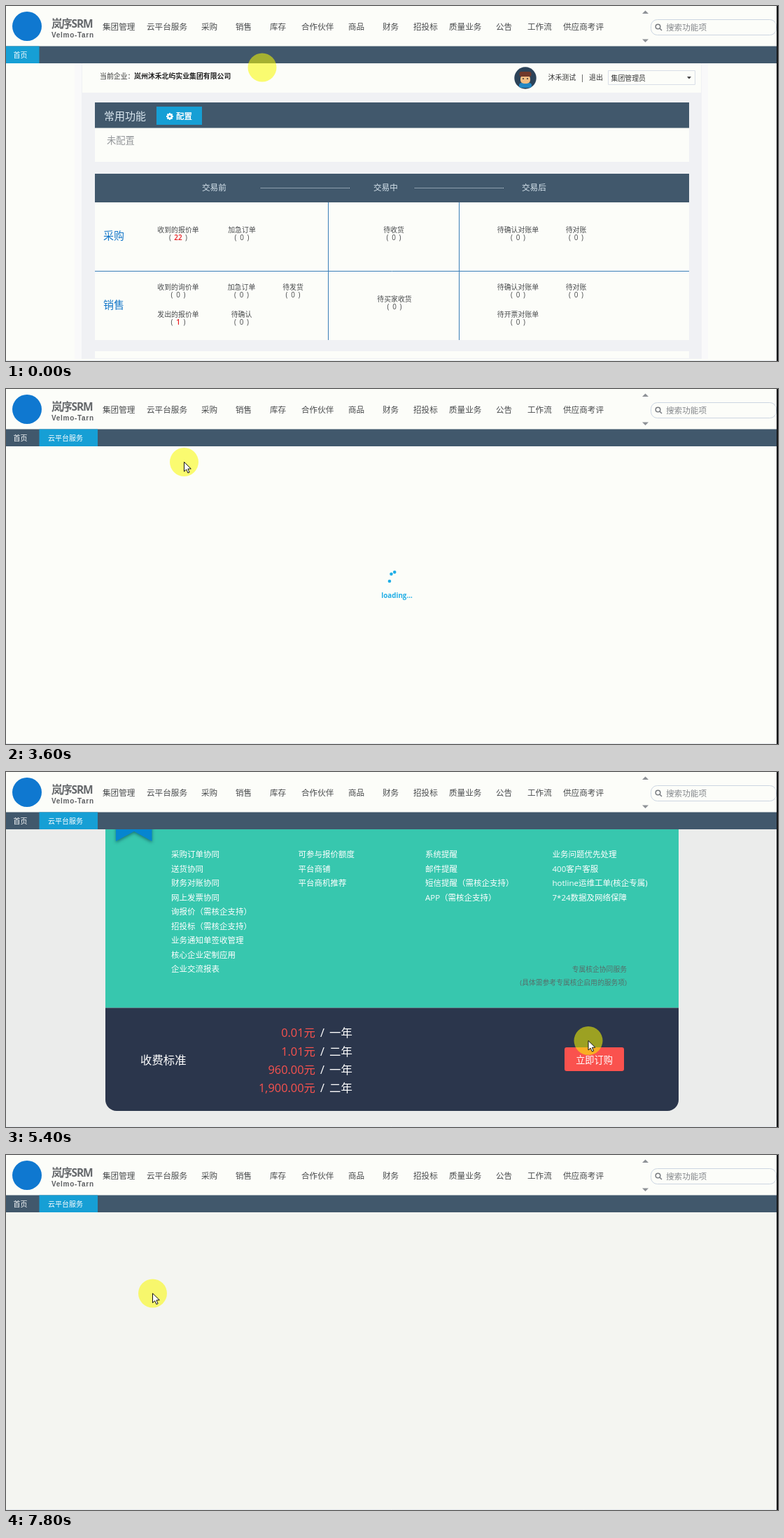
Recreate the animation shown at these times as an HTML page with a canvas. Size 1103 px wide and 508 px high, loop 8000 ms.

```html
<!DOCTYPE html>
<html lang="zh-CN">
<head>
<meta charset="utf-8">
<style>
html, body { margin: 0; width: 100%; height: 100%; overflow: hidden; background: #fcfdf9; }
canvas { display: block; }
</style>
</head>
<body>
<canvas id="stage" width="1103" height="508"></canvas>
<script>
const ctx = document.getElementById('stage').getContext('2d');
const LOOP = 8000, STEP = 200;
const FONT = '"Open Sans", "Noto Sans CJK SC", "Noto Sans CJK", sans-serif';
const PAPER = '#fcfdf9', SLATE = '#41586c', SKY = '#169fd5', NAVY = '#2b364c',
      TEAL = '#37c7ae', RED = '#fa524e', BLUE = '#1477c9', INK = '#484a4c';

function rect(x, y, w, h, fill, radius = 0, stroke) {
  ctx.beginPath();
  ctx.roundRect(x, y, w, h, radius);
  if (fill) { ctx.fillStyle = fill; ctx.fill(); }
  if (stroke) { ctx.strokeStyle = stroke; ctx.lineWidth = 1; ctx.stroke(); }
}

function circle(x, y, r, fill) {
  ctx.beginPath();
  ctx.arc(x, y, r, 0, Math.PI * 2);
  ctx.fillStyle = fill;
  ctx.fill();
}

function polygon(points, fill, stroke) {
  ctx.beginPath();
  points.forEach(([x, y]) => ctx.lineTo(x, y));
  ctx.closePath();
  ctx.fillStyle = fill;
  ctx.fill();
  if (stroke) { ctx.strokeStyle = stroke; ctx.lineWidth = 1; ctx.stroke(); }
}

function line(x1, y1, x2, y2, color, dash = []) {
  ctx.beginPath();
  ctx.setLineDash(dash);
  ctx.moveTo(x1, y1);
  ctx.lineTo(x2, y2);
  ctx.strokeStyle = color;
  ctx.lineWidth = 1;
  ctx.stroke();
  ctx.setLineDash([]);
}

// y is the vertical middle of the glyphs
function text(str, x, y, size, color, align = 'left', weight = 400) {
  ctx.font = `${weight} ${size}px ${FONT}`;
  ctx.textAlign = align;
  ctx.fillStyle = color;
  ctx.fillText(str, x, y + size * 0.38);
}

// Interpolates rows of [time, ...values]
function track(keys, t, ease = u => u) {
  const i = keys.findLastIndex(k => k[0] <= t);
  const a = keys[i], b = keys[i + 1] || a;
  const u = b === a ? 0 : ease((t - a[0]) / (b[0] - a[0]));
  return a.slice(1).map((v, n) => v + (b[n + 1] - v) * u);
}

const smooth = u => u * u * (3 - 2 * u);

const MENU = [['集团管理', 138], ['云平台服务', 201], ['采购', 279], ['销售', 328], ['库存', 377],
  ['合作伙伴', 422], ['商品', 489], ['财务', 538], ['招投标', 582], ['质量业务', 633],
  ['公告', 700], ['工作流', 745], ['供应商考评', 796]];

function drawHeader(serviceOpen) {
  rect(0, 0, 1103, 58, PAPER);
  circle(30, 29, 21, '#0f78d0');
  ctx.letterSpacing = '-1.2px';
  text('岚序SRM', 65, 25, 15.5, '#66696c', 'left', 700);
  ctx.letterSpacing = '0.7px';
  ctx.font = 'bold 10px "Liberation Sans", sans-serif';
  ctx.fillStyle = '#5d5f62';
  ctx.fillText('Velmo-Tarn', 65, 45);
  ctx.letterSpacing = '0px';
  MENU.forEach(([label, x]) => text(label, x, 29.5, 11.6, INK));

  polygon([[909, 11], [913.5, 6.5], [918, 11]], '#8d9196');
  polygon([[909, 47.5], [913.5, 52], [918, 47.5]], '#8d9196');
  rect(921.5, 19.5, 179, 22, PAPER, 9, '#ccd6e2');
  ctx.beginPath();
  ctx.arc(931.5, 29.5, 3.3, 0, 7);
  ctx.moveTo(934, 32);
  ctx.lineTo(937, 35);
  ctx.strokeStyle = '#777b80';
  ctx.lineWidth = 1.5;
  ctx.stroke();
  text('搜索功能项', 943, 30.5, 11.6, '#85888c');

  rect(0, 57.5, 1101, 24.5, SLATE);
  if (serviceOpen) {
    rect(47.5, 57.5, 83.5, 24.5, SKY);
    text('云平台服务', 60, 70, 10, '#fff');
  } else {
    rect(0, 57.5, 47.5, 24.5, SKY);
  }
  text('首页', 10.5, 70, 10, '#fff');
}

const TASKS = [['收到的报价单', 246, 320, 22], ['加急订单', 337, 320, 0], ['待收货', 554, 320, 0],
  ['待确认对账单', 731.5, 320, 0], ['待对账', 814.5, 320, 0],
  ['收到的询价单', 246, 402.5, 0], ['加急订单', 336.5, 402.5, 0], ['待发货', 410, 402.5, 0],
  ['待买家收货', 555, 419, 0], ['待确认对账单', 731.5, 402.5, 0], ['待对账', 814.5, 402.5, 0],
  ['发出的报价单', 246, 441.5, 1], ['待确认', 336.5, 441.5, 0], ['待开票对账单', 731.5, 441.5, 0]];

function drawAvatar() {
  circle(742, 103, 15.7, '#2c4359');
  rect(733, 110, 18, 7, '#2387c4', 5);
  rect(735, 99, 14, 12, '#f2bd83', 5);
  rect(733.5, 94, 17, 7, '#70382a', 3);
  circle(739, 104, 1, '#333');
  circle(745, 104, 1, '#333');
}

function drawGear(x, y) {
  ctx.beginPath();
  for (let i = 0; i < 8; i++) {
    const a = i * Math.PI / 4;
    ctx.moveTo(x, y);
    ctx.lineTo(x + 5 * Math.cos(a), y + 5 * Math.sin(a));
  }
  ctx.strokeStyle = '#fff';
  ctx.lineWidth = 2;
  ctx.stroke();
  circle(x, y, 3.9, '#fff');
  circle(x, y, 1.6, SKY);
}

function drawHome() {
  rect(98, 82, 905, 423, '#f9f9fa');
  rect(108, 82, 886, 423, '#f0f1f4');
  rect(109, 82, 884, 42, PAPER);
  text('当前企业：', 134, 100.5, 9.9, '#333');
  text('岚州沐禾北屿实业集团有限公司', 183, 100.5, 9.9, '#222', 'left', 700);
  drawAvatar();
  text('沐禾测试', 774.5, 102.5, 9.9, '#333');
  text('|', 823.5, 102.5, 9.9, '#333', 'center');
  text('退出', 833, 102.5, 9.9, '#333');
  rect(860.5, 92.5, 124, 20, PAPER, 0, '#d9dee7');
  text('集团管理员', 864.5, 103, 9.9, '#333');
  polygon([[973, 101], [979, 101], [976, 104.5]], '#444');

  rect(127, 174, 849, 49, PAPER);
  rect(127, 138, 849, 36.5, SLATE);
  text('常用功能', 140, 157, 15, '#d9e6ef');
  rect(215, 144, 65, 26, SKY);
  drawGear(234, 158);
  text('配置', 243, 158, 11.5, '#fff', 'left', 700);
  text('未配置', 144, 191.5, 13.3, '#939699');

  rect(127, 281, 849, 197, PAPER);
  rect(127, 494, 849, 10, PAPER);
  rect(127, 240, 849, 41, SLATE);
  [['交易前', 280], ['交易中', 525], ['交易后', 737]].forEach(([s, x]) => text(s, x, 260, 11.6, '#d9e6ef'));
  line(364, 260.5, 491, 260.5, '#d9e6ef', [1, 1]);
  line(584, 260.5, 712, 260.5, '#d9e6ef', [1, 1]);
  line(127, 379.5, 976, 379.5, '#3a7eb8');
  line(460.5, 281, 460.5, 478, '#3a7eb8');
  line(647.5, 281, 647.5, 478, '#3a7eb8');
  text('采购', 139, 328.5, 15, BLUE);
  text('销售', 139, 427.5, 15, BLUE);
  for (const [label, x, y, count] of TASKS) {
    const gap = count > 9 ? 11.5 : 9;
    text(label, x, y, 9.9, INK, 'center');
    text('(', x - gap, y + 11, 9.9, INK, 'center');
    text(count, x, y + 11, 9.9, count ? '#e8191f' : INK, 'center', count ? 600 : 400);
    text(')', x + gap, y + 11, 9.9, INK, 'center');
  }
}

function drawLoading(t) {
  const turn = (t - 3600) / 1000 * Math.PI * 2;
  for (const degrees of [163, 225, 256]) {
    const a = degrees * Math.PI / 180 + turn;
    circle(557.7 + 10.2 * Math.cos(a), 272 + 10.2 * Math.sin(a), 2.3, '#20aee6');
  }
  text('loading...', 558.5, 295.5, 9.8, '#20aee6', 'center', 700);
}

const SERVICES = [
  ['企业专属', 236, ['采购订单协同', '送货协同', '财务对账协同', '网上发票协同', '询报价（需核企支持）',
    '招投标（需核企支持）', '业务通知单签收管理', '核心企业定制应用', '企业交流报表']],
  ['商机推广', 417.5, ['可参与报价额度', '平台商铺', '平台商机推荐']],
  ['通知服务', 599, ['系统提醒', '邮件提醒', '短信提醒（需核企支持）', 'APP（需核企支持）']],
  ['系统保障', 780.5, ['业务问题优先处理', '400客户客服', 'hotline运维工单(核企专属)', '7*24数据及网络保障']]
];
const PRICES = [['0.01元', '一年'], ['1.01元', '二年'], ['960.00元', '一年'], ['1,900.00元', '二年']];
const RECORDS = [['2017-08-09 17:08:24', '沐禾测试'], ['2017-07-21 11:29:32', '苏砚禾']];

function drawRibbon() {
  ctx.save();
  ctx.shadowColor = 'rgba(0,40,60,.5)';
  ctx.shadowBlur = 4;
  ctx.shadowOffsetY = 2;
  polygon([[157, 205], [208.5, 205], [208.5, 294], [183, 280], [157, 294]], '#0585d0');
  ctx.restore();
  text('服务', 183, 229, 15.2, '#fff', 'center', 700);
  text('内容', 183, 253.5, 15.2, '#fff', 'center', 700);
}

function drawServices(scroll) {
  rect(0, 82, 1101, 425, '#ebeceb');
  ctx.save();
  ctx.beginPath();
  ctx.rect(0, 82, 1101, 426);
  ctx.clip();
  ctx.translate(0, -scroll);

  rect(142, -63, 819, 169, PAPER);
  rect(142, -63, 273, 169, NAVY);
  text('企业标准服务（企业必备）', 453.5, 157, 16.4, '#2b2c2e', 'left', 700);

  rect(142, 205, 819, 327.5, TEAL, [16, 16, 0, 0]);
  drawRibbon();
  for (const [title, x, items] of SERVICES) {
    text(title, x, 255, 16.4, '#fff');
    items.forEach((item, i) => text(item, x, 313 + i * 20.5, 11.5, '#fff'));
  }
  text('专属核企协同服务', 887, 477, 9.8, '#566d69', 'right');
  text('(具体需参考专属核企启用的服务项)', 887, 496, 9.8, '#566d69', 'right');

  rect(142, 532.5, 819, 147.5, NAVY, [0, 0, 16, 16]);
  text('收费标准', 192, 607, 16.4, '#fff');
  PRICES.forEach(([price, term], i) => {
    const y = 568 + i * 26.3;
    text(price, 442, y, 16.4, RED, 'right');
    text('/', 452, y, 16.4, '#fff', 'center');
    text(term, 462, y, 16.4, '#fff');
  });
  rect(798, 589, 85, 34, RED, 3);
  text('立即订购', 840.5, 607, 13.2, '#fff', 'center');

  text('交易记录', 551.5, 730, 16.4, '#2b2c2e', 'center', 700);
  rect(142, 780, 819, 41, NAVY);
  text('最近交易记录', 281.5, 801, 11.5, '#fff', 'center');
  [['我要开票', 783.5], ['我要退款', 872]].forEach(([label, x]) => {
    rect(x, 788, 72, 25, TEAL, 4);
    text(label, x + 36, 801, 10, '#fff', 'center');
  });
  RECORDS.forEach(([date, payer], i) => {
    const y = 821 + i * 42;
    rect(142.5, y - 0.5, 818, 42, i ? PAPER : '#f6f7f5', 0, '#d9dce4');
    text(date, 281, y + 21.5, 10, '#333', 'center');
    text('SRM云平台基础功能年度费', 591.5, y + 21.5, 9.9, '#333', 'center');
    text(payer, 819.5, y + 21.5, 9.9, '#333', 'center');
    text('0.01元', 918, y + 21.5, 9.9, '#333', 'center');
  });
  ctx.restore();
}

const ARROW = [[0, 0], [0, 13.5], [3.2, 10.6], [5.4, 15.6], [7.6, 14.6], [5.4, 9.8], [9.8, 9.6]];
const HAND = [[4, 1], [6, 1], [6.5, 6], [9, 6], [11, 7], [13, 8], [13.5, 12], [11.5, 18], [5, 18],
  [0, 11], [1, 9.5], [4, 11.5]];

function drawPointer(x, y, shape, clicking) {
  circle(x, y, 20.5, 'rgba(250,250,0,.55)');
  if (clicking) {
    ctx.beginPath();
    ctx.arc(x, y, 17, 0, Math.PI * 2);
    ctx.strokeStyle = '#d8200c';
    ctx.lineWidth = 2.5;
    ctx.stroke();
  }
  if (!shape) return;
  ctx.save();
  ctx.translate(x, y);
  ctx.lineJoin = 'round';
  polygon(shape, '#fff', '#111');
  ctx.restore();
}

const PATH = [[0, 366, 88], [1200, 303, 44], [2400, 230, 36], [2800, 230, 36], [3600, 254.5, 104.5],
  [3800, 442, 218], [4600, 442, 218], [5400, 832, 384.5], [5600, 832, 384.5], [6400, 822.5, 364],
  [6600, 822.5, 364], [7800, 209.5, 198]];
const SCROLL = [[0, -195], [4200, -195], [4600, 0], [5000, 195], [5400, 195], [6200, 439]];

function pointerShape(t) {
  if (t < 200 || (t >= 3800 && t <= 4600)) return null;
  const overLink = (t >= 1000 && t < 3000) || (t >= 6200 && t < 6800);
  return overLink ? HAND : ARROW;
}

function draw(now) {
  const t = Math.floor(now % LOOP / STEP) * STEP;
  rect(0, 0, 1103, 508, PAPER);
  if (t < 3000) drawHome();
  else if (t < 3800) drawLoading(t);
  else if (t < 6600) drawServices(track(SCROLL, t)[0]);
  else rect(0, 82, 1101, 425, '#f4f5f1');
  drawHeader(t >= 3000);
  line(0, 507.5, 1101, 507.5, '#e4e8ec');
  const [x, y] = track(PATH, t, smooth);
  drawPointer(x, y, pointerShape(t), t === 2800 || t === 6400);
  rect(1101, 0, 2, 508, '#17181a');
}

let start;
function tick(now) {
  start ??= now;
  draw(now - start);
  requestAnimationFrame(tick);
}
requestAnimationFrame(tick);
</script>
</body>
</html>
```
